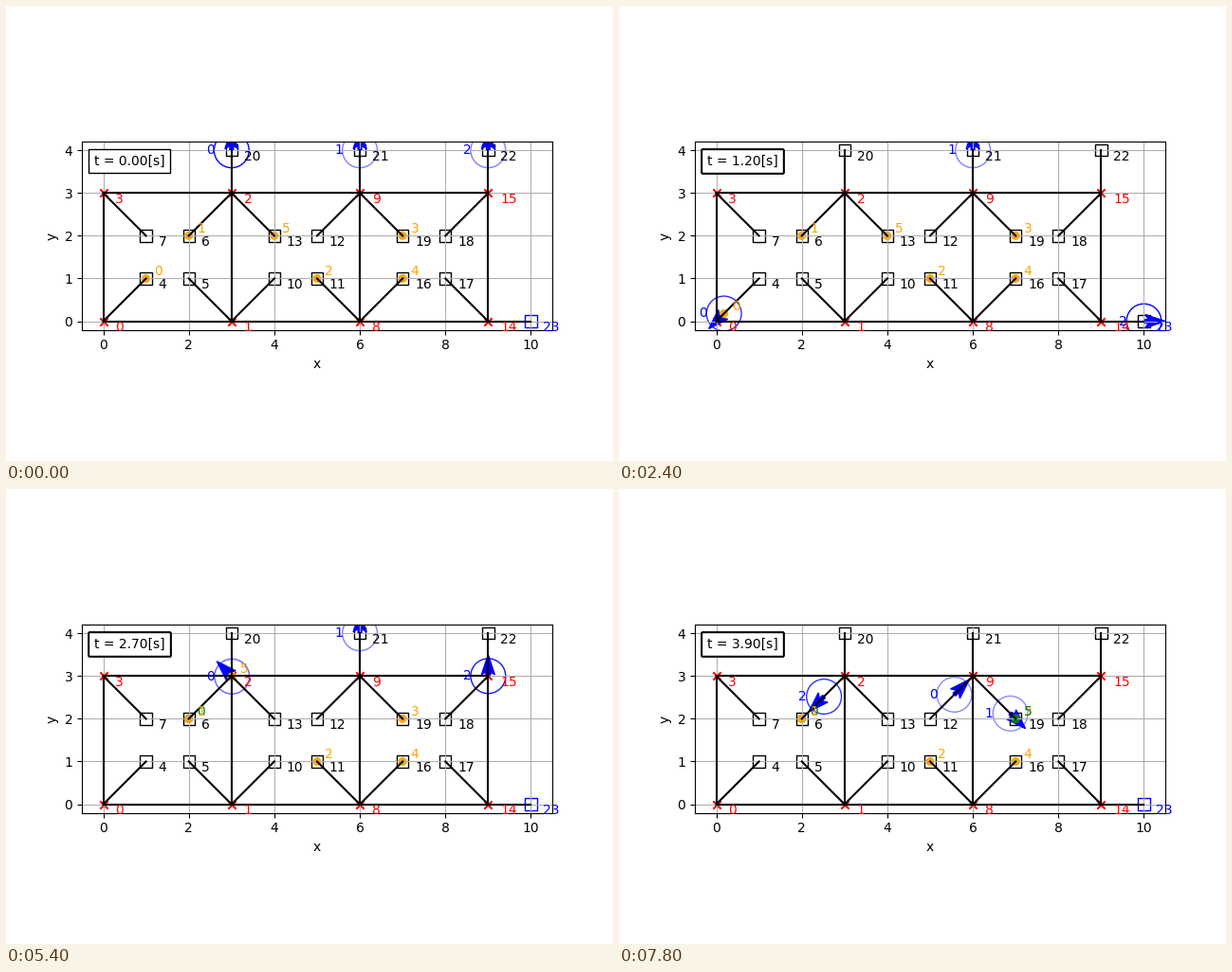
Animation, 640 px wide and 480 px high, one loop 8 s. Source, as a matplotlib script:

```python
import math

import matplotlib.pyplot as plt
import numpy as np
from matplotlib.animation import FuncAnimation
from matplotlib.patches import Circle, Polygon

FRAMES, INTERVAL, DT = 40, 200, 0.1
SPEED, TICK, DRAIN = 8.0, 0.005, 0.018
BAYS, SIDE = 3, 3


def square(x, y, side):
    return [(x, y), (x + side, y), (x + side, y + side), (x, y + side)]


def build_map():
    """Rooms in a row, four shelves in each, docks above and one charger."""
    nodes, edges = [], set()
    for x in range(0, BAYS * SIDE, SIDE):
        room, shelves = square(x, 0, SIDE), square(x + 1, 1, 1)
        nodes += [p for p in room if p not in nodes] + shelves
        edges |= {tuple(sorted(e)) for e in zip(room, room[1:] + room[:1])}
        edges |= set(zip(room, shelves))
    for x in range(SIDE, BAYS * SIDE + 1, SIDE):
        nodes.append((x, SIDE + 1))
        edges.add(((x, SIDE), (x, SIDE + 1)))
    nodes.append((BAYS * SIDE + 1, 0))
    edges.add(((BAYS * SIDE, 0), nodes[-1]))
    return nodes, sorted(edges)


NODES, EDGES = build_map()
CHARGER = NODES[-1]
NEAR = {p: [b if a == p else a for a, b in EDGES if p in (a, b)] for p in NODES}

# Each agent: first charge, first node, then (earliest departure, goal node).
AGENTS = [
    (1.0, 20, [(0, 4), (0, 6), (0, 13), (0, 19), (3.44, 12), (0, 9)]),
    (0.5, 21, [(3.62, 19)]),
    (0.5, 22, [(0, 23), (1.24, 15), (3.065, 6)]),
]
ITEM_HOME = [4, 6, 11, 19, 16, 13]
PICKUP_STOP = {0: 0, 5: 2}  # item -> stop of agent 0; dropped one stop later

# Arrow outline in data units, pointing along +x.
half = np.array([(0, 0.043), (0.11, 0.043), (0.03, 0.155), (0.5, 0)])
ARROW = np.vstack([half, half[-2::-1] * (1, -1)])


def paths(a, b, seen=()):
    seen += (a,)
    if a == b:
        yield seen
    else:
        for p in NEAR[a]:
            if p not in seen:
                yield from paths(p, b, seen)


def shortest(a, b):
    """Shortest path; of equals, the one through the upper aisle."""
    def cost(path):
        length = sum(math.dist(p, q) for p, q in zip(path, path[1:]))
        return round(length, 6), -sum(y for _, y in path)
    return min(paths(a, b), key=cost)


def plan(start, goals):
    """Straight legs (departure, from, to) and stops (arrival, node)."""
    legs, stops, t, here = [], [], 0.0, NODES[start]
    for earliest, goal in goals:
        t = max(t, earliest)
        path = shortest(here, NODES[goal])
        for p, q in zip(path, path[1:]):
            legs.append((t, np.array(p, float), np.array(q, float)))
            t += math.ceil(math.dist(p, q) / (SPEED * TICK) - 1e-9) * TICK
        here = path[-1]
        stops.append((t, here))
    return legs, stops


def agent_state(legs, t):
    """Position, heading and distance travelled at time t."""
    pos, angle, total = legs[0][1], math.pi / 2, 0.0
    for start, p, q in legs:
        if t <= start + 1e-9:
            break
        length = math.dist(p, q)
        done = min(SPEED * (t - start), length)
        pos = p + (q - p) * done / length
        angle = math.atan2(q[1] - p[1], q[0] - p[0])
        total += done
    return pos, angle, total


def arrow_at(pos, angle):
    c, s = math.cos(angle), math.sin(angle)
    return pos + ARROW @ np.array([(c, s), (-s, c)])


PLANS = [plan(start, goals) for _, start, goals in AGENTS]


def item_state(i, t, carrier):
    if i in PICKUP_STOP:
        k = PICKUP_STOP[i]
        (pick, _), (drop, goal) = PLANS[0][1][k:k + 2]
        if t >= drop:
            return goal, "green"
        if t >= pick:
            return carrier, "orange"
    return NODES[ITEM_HOME[i]], "orange"


def node_color(p):
    if p == CHARGER:
        return "blue"
    return "red" if p[0] % SIDE == 0 and p[1] % SIDE == 0 else "black"


fig, ax = plt.subplots(figsize=(6.4, 4.8), dpi=100)
ax.set_xlim(-0.5, 10.5)
ax.set_ylim(-0.2, 4.2)
ax.set_aspect("equal")
ax.set_xlabel("x")
ax.set_ylabel("y")
ax.grid()

for a, b in EDGES:
    ax.plot(*zip(a, b), color="k", lw=1.5)

for n, p in enumerate(NODES):
    color = node_color(p)
    if color == "red":
        ax.scatter(*p, marker="x", s=36, color=color, lw=1.5)
    else:
        box = ax.scatter(*p, marker="s", s=80, fc="none", ec=color, lw=1)
    ax.text(p[0] + 0.285, p[1] - 0.235, str(n), color=color)
charger_box = box

rings = [ax.add_patch(Circle((0, 0), 0.408, fill=False, ec="blue", lw=1)) for _ in AGENTS]
arrows = [ax.add_patch(Polygon(ARROW, color="blue", lw=1)) for _ in AGENTS]
names = [ax.text(0, 0, str(k), color="blue", ha="center", va="center")
         for k in range(len(AGENTS))]
dots = [ax.add_patch(Circle((0, 0), 0.1, lw=0)) for _ in ITEM_HOME]
tags = [ax.text(0, 0, str(i)) for i in range(len(ITEM_HOME))]

# Stacked clock boxes: the border grows heavier over the first frames.
clocks = [ax.text(0.1007, 0.8982, "", transform=ax.transAxes, ha="center", va="center",
                  bbox=dict(facecolor="white", edgecolor="black", lw=1, pad=4.25))
          for _ in range(10)]


def update(n):
    t = n * DT
    states = [agent_state(legs, t) for legs, _ in PLANS]

    for k, (pos, angle, total) in enumerate(states):
        charge = AGENTS[k][0] - DRAIN * total
        for arrival, node in PLANS[k][1]:
            if node == CHARGER:
                charge += 0.59 * min(max((t - arrival) / 0.5, 0), 1)
        rings[k].center = pos
        rings[k].set_alpha(min(max(charge, 0), 1))
        arrows[k].set_xy(arrow_at(pos, angle))
        names[k].set_position((pos[0] - 0.495, pos[1]))

    for i, (dot, tag) in enumerate(zip(dots, tags)):
        (x, y), color = item_state(i, t, states[0][0])
        dot.center = (x, y)
        dot.set_facecolor(color)
        tag.set_position((x + 0.185, y + 0.085))
        tag.set_color(color)

    docked = any(np.allclose(pos, CHARGER) for pos, *_ in states)
    charger_box.set_edgecolor("black" if docked else "blue")

    for k, clock in enumerate(clocks):
        clock.set_text(f"t = {t:.2f}[s]")
        clock.set_visible(k <= n)
    return []


anim = FuncAnimation(fig, update, frames=FRAMES, interval=INTERVAL,
                     init_func=lambda: update(0), repeat=True, repeat_delay=0)
plt.show()
```
